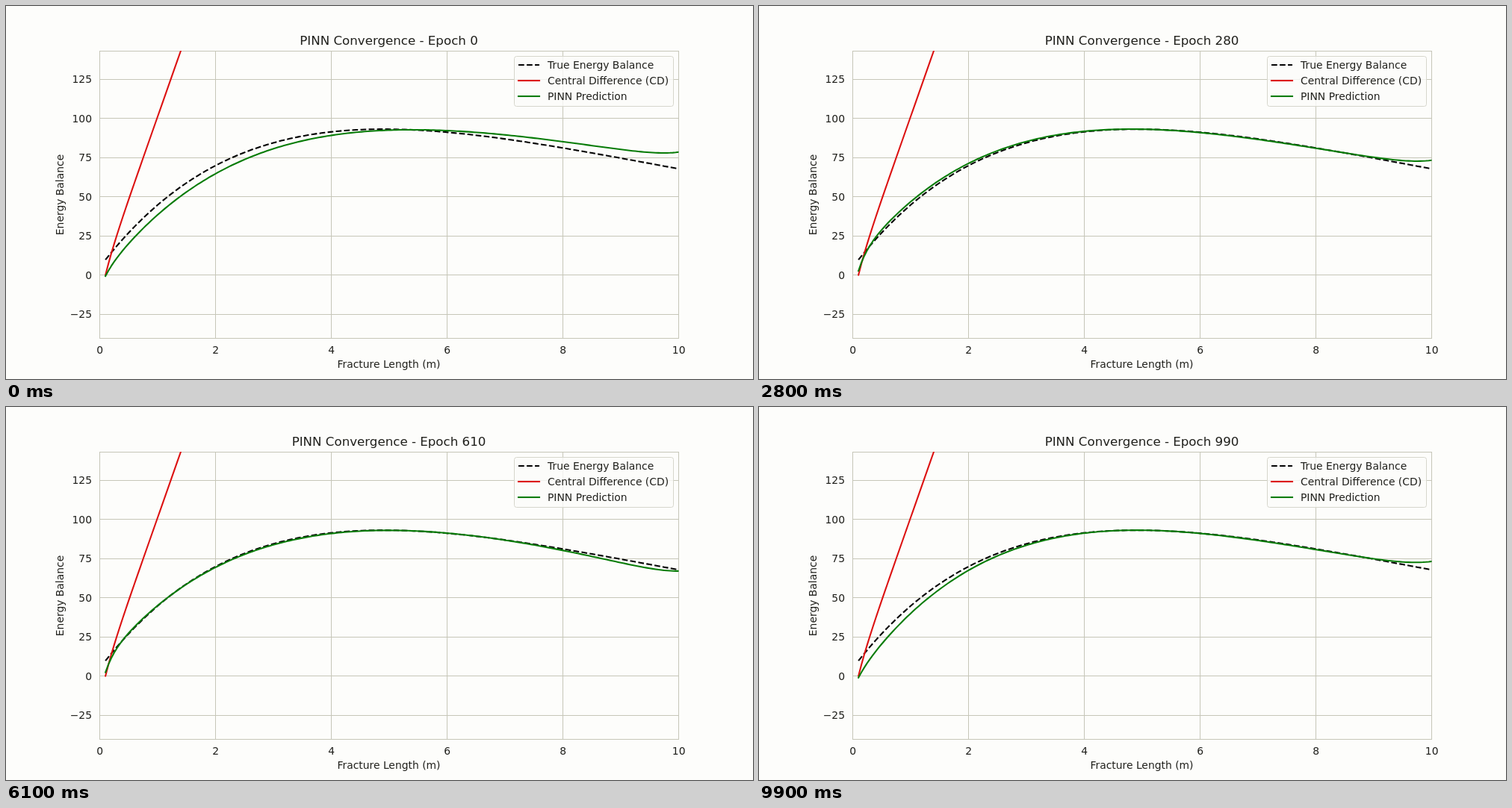
Recreate the animation shown at these times as an HTML page. Size 1000 by 500 pixels, loop 10000 ms.

```html
<!DOCTYPE html>
<html lang="en">
<head>
<meta charset="utf-8">
<title>PINN Convergence</title>
<style>
  html, body { margin: 0; width: 100%; height: 100%; overflow: hidden; background: #fdfdfb; }
  svg { display: block; width: 1000px; height: 500px; }
  text { font: 13.89px "DejaVu Sans", sans-serif; fill: #20201c; }
  .title { font-size: 16.67px; }
  .mid { text-anchor: middle; }
  .end { text-anchor: end; }
  .grid { stroke: #c6c6b8; stroke-width: 1; fill: none; }
  .curve { fill: none; stroke-width: 2.08; stroke-linejoin: round; }
  .true { stroke: #000; stroke-dasharray: 7.7 3.33; }
  .cd { stroke: #dc1010; stroke-linecap: square; }
  .pinn { stroke: #087c08; stroke-linecap: square; }
  .box { fill: #fdfdfb; fill-opacity: .8; stroke: #d6d6cc; }
</style>
</head>
<body>
<svg viewBox="0 0 1000 500">
  <clipPath id="plot"><rect x="125" y="60" width="775.5" height="385"/></clipPath>
  <g id="axes"></g>
  <g clip-path="url(#plot)">
    <path id="true" class="curve true"/>
    <path id="cd" class="curve cd"/>
    <path id="pinn" class="curve pinn"/>
  </g>
  <g id="legend"><rect class="box" x="680.5" y="67.5" width="213" height="67" rx="3"/></g>
  <text id="title" class="title mid" x="512.5" y="52"></text>
  <text class="mid" x="512.5" y="485">Fracture Length (m)</text>
  <text class="mid" transform="translate(77 253) rotate(-90)">Energy Balance</text>
</svg>
<script>
const STEP_MS = 100, STEPS = 100, EPOCHS_PER_STEP = 10;
const X_MIN = 0.1, X_MAX = 10, SAMPLES = 200;
const { exp, floor } = Math;
const $ = id => document.getElementById(id);
const px = v => 125.4 + 77.5 * v;
const py = v => 360.6 - 2.1 * v;
const snap = v => floor(v) + 0.5;

function add(parent, tag, attrs, text = '') {
  const el = document.createElementNS('http://www.w3.org/2000/svg', tag);
  for (const key in attrs) el.setAttribute(key, attrs[key]);
  el.textContent = text;
  parent.append(el);
}

function plot(id, fn) {
  const points = Array.from({ length: SAMPLES }, (_, i) => {
    const x = X_MIN + (X_MAX - X_MIN) * i / (SAMPLES - 1);
    return `${px(x).toFixed(2)} ${py(fn(x)).toFixed(2)}`;
  });
  $(id).setAttribute('d', 'M' + points.join('L'));
}

for (let v = 0; v <= 10; v += 2) {
  add($('axes'), 'path', { class: 'grid', d: `M${snap(px(v))} 60V445` });
  add($('axes'), 'text', { class: 'mid', x: px(v) + 0.3, y: 466 }, v);
}
for (let v = -25; v <= 125; v += 25) {
  add($('axes'), 'path', { class: 'grid', d: `M125 ${snap(py(v))}H900` });
  add($('axes'), 'text', { class: 'end', x: 115, y: py(v) + 5 }, String(v).replace('-', '\u2212'));
}
add($('axes'), 'rect', { class: 'grid', x: 125.5, y: 60.5, width: 775, height: 385 });

[['true', 'True Energy Balance'], ['cd', 'Central Difference (CD)'], ['pinn', 'PINN Prediction']]
  .forEach(([kind, label], i) => {
    const y = 79 + 21 * i;
    add($('legend'), 'path', { class: `curve ${kind}`, d: `M686 ${y}h28` });
    add($('legend'), 'text', { x: 725, y: y + 4.6 }, label);
  });

const trueEnergy = x => 49.6 * (x + 0.1) * exp(-x / 5);
const centralDifference = x => 105 * x - 4 - 6.5 * exp((X_MIN - x) / 0.15);

// Prediction error at four lengths, keyed by animation step.
const knots = [0.5, 2, 5, 9];
const keys = [
  { step: 0, error: [-6.7, -5.2, -0.6, 5] },
  { step: 12, error: [-1.9, 1, 1.9, 8.2] },
  { step: 28, error: [2.4, 1.4, 0, 0] },
  { step: 46, error: [1.7, 3.1, -0.9, -2.8] },
  { step: 61, error: [1, -0.5, -0.1, -2.8] },
  { step: 76, error: [3.3, 1.7, -4.1, -9.3] },
  { step: 99, error: [-6.4, -2.4, 0, -0.3] },
];

function errorAt(step) {
  const next = Math.max(1, keys.findIndex(key => key.step >= step));
  const a = keys[next - 1], b = keys[next];
  const k = (step - a.step) / (b.step - a.step);
  return a.error.map((e, i) => e + (b.error[i] - e) * k);
}

// Cubic through the knots (Lagrange form).
const cubic = (x, values) => values.reduce((sum, value, i) =>
  sum + knots.reduce((p, knot, j) => j === i ? p : p * (x - knot) / (knots[i] - knot), value), 0);

// The error drops sharply at the left edge and curls up at the right one.
function prediction(step) {
  const error = errorAt(step);
  const drop = -8 - 0.65 * cubic(X_MIN, error);
  return x => trueEnergy(x) + cubic(x, error)
    + drop * exp((X_MIN - x) / 0.14) + 5 * exp((x - X_MAX) / 0.45);
}

plot('true', trueEnergy);
plot('cd', centralDifference);

let shown = -1;
function frame() {
  const step = floor(performance.now() / STEP_MS) % STEPS;
  if (step !== shown) {
    shown = step;
    plot('pinn', prediction(step));
    $('title').textContent = `PINN Convergence - Epoch ${step * EPOCHS_PER_STEP}`;
  }
  requestAnimationFrame(frame);
}
frame();
</script>
</body>
</html>
```
